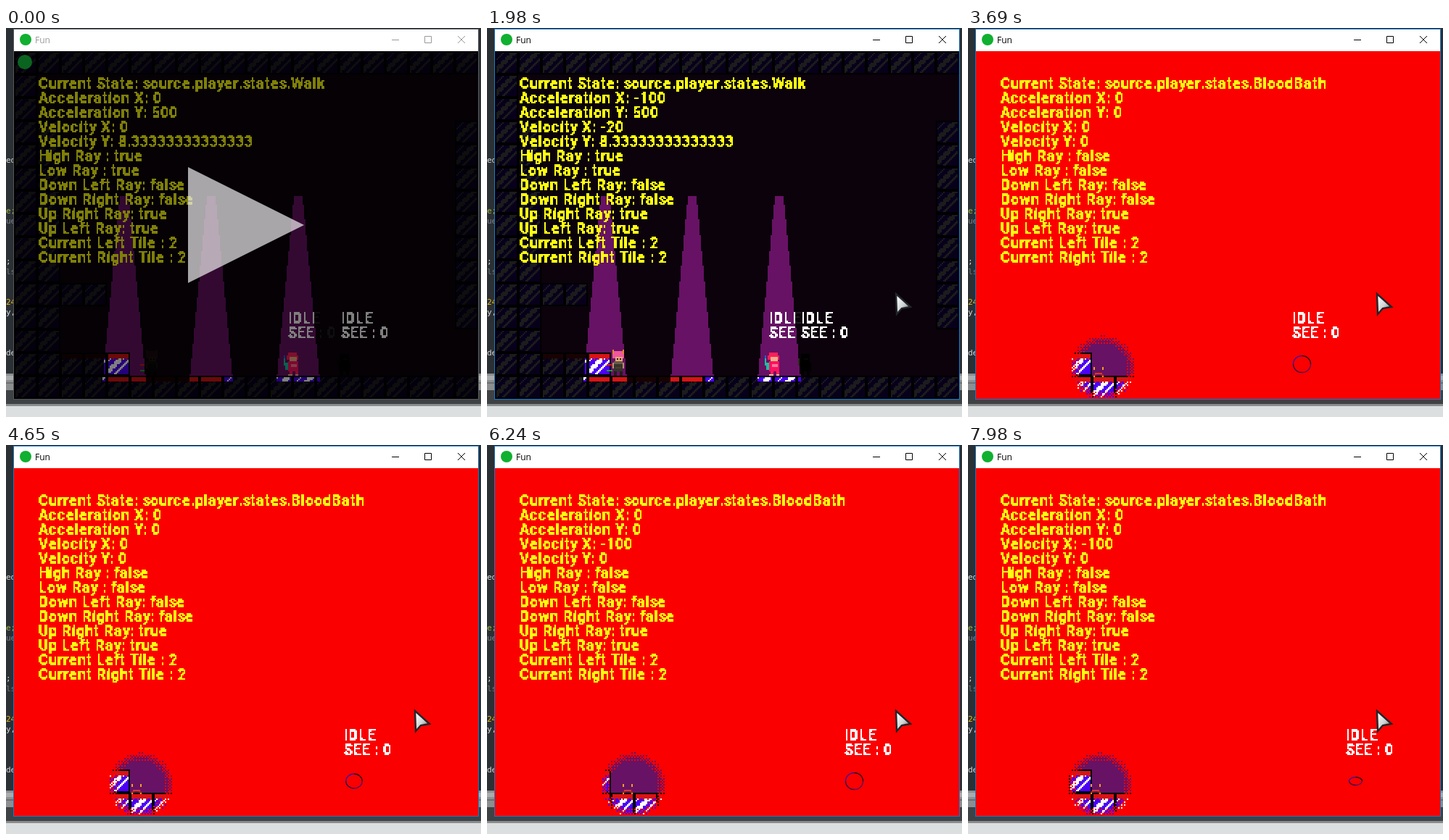
An HTML page with a canvas that plays this animation: 655x537 px, repeating every 8 s.

```html
<!DOCTYPE html>
<html lang="en">
<head>
<meta charset="utf-8">
<title>Fun</title>
<style>
  html, body { margin: 0; width: 100%; height: 100%; overflow: hidden; background: #2b3035; }
  canvas { display: block; image-rendering: pixelated; }
</style>
</head>
<body>
<canvas id="stage" width="655" height="537"></canvas>
<script>
const LOOP = 8000, FOCUS = 600, RED_START = 3060, RED_END = 3450;
const GX = 11, GY = 32, GW = 320, GH = 240;

const makeCtx = (w, h) => {
  const c = document.createElement('canvas');
  c.width = w;
  c.height = h;
  return c.getContext('2d', { willReadFrequently: true });
};
const ctx = document.getElementById('stage').getContext('2d');
const world = makeCtx(GW, GH), scene = makeCtx(GW, GH), mask = makeCtx(GW, GH);
const clamp = (v, a, b) => Math.min(b, Math.max(a, v));
const toGame = x => Math.round((x - GX) / 2);

function rect(g, color, x, y, w, h) {
  g.fillStyle = color;
  g.fillRect(x, y, w, h);
}

// Linear interpolation through [time, value] pairs.
function track(keys, t) {
  for (let i = 1; i < keys.length; i++) {
    const [t0, v0] = keys[i - 1], [t1, v1] = keys[i];
    if (t < t1) return v0 + (v1 - v0) * clamp((t - t0) / (t1 - t0), 0, 1);
  }
  return keys[keys.length - 1][1];
}

const ENEMY = [[600, 463], [1290, 448], [2080, 432], [2900, 432], [5220, 479],
  [6000, 494], [6540, 494], [7980, 522]];
const WALK = [[1500, 200], [2050, 179]];
const BATH = [[4740, 186], [5310, 300], [5750, 300], [6340, 182], [6780, 182],
  [7030, 232], [7440, 232], [7690, 182]];

/* Pixel text: glyphs on whole pixels, hard edges, doubled when shown */
const textCache = new Map();
function pixelText(text, color) {
  const key = color + text;
  if (textCache.has(key)) return textCache.get(key);
  const g = makeCtx(text.length * 10 + 4, 12);
  g.font = 'bold 10px Roboto, sans-serif';
  g.fillStyle = color;
  let x = 0;
  for (const ch of text) {
    g.fillText(ch, x, 8);
    x += Math.round(g.measureText(ch).width + 0.3);
  }
  const img = g.getImageData(0, 0, g.canvas.width, 12);
  for (let i = 3; i < img.data.length; i += 4) img.data[i] = img.data[i] > 95 ? 255 : 0;
  g.putImageData(img, 0, 0);
  textCache.set(key, g.canvas);
  return g.canvas;
}
function label(text, color, x, y) {
  const s = pixelText(text, color);
  ctx.drawImage(s, Math.round(x) - 1, y, s.width * 2, s.height * 2);
}

/* Level */
const isSolid = (c, r) => r === 0 || r === 14 || c === 0 || (c === 1 && r >= 3) ||
  (c === 19 && r >= 3 && r <= 11) || (r === 10 && c < 4) || (r === 13 && c < 5);
const isBloody = (c, r) => (r === 13 && c >= 2 && c <= 4) || (r === 14 && c >= 4 && c <= 8);

function drawTile(g, c, r) {
  const ox = c * 16, oy = r * 16;
  rect(g, '#000', ox, oy, 16, 16);
  for (let y = 1; y < 15; y++) {
    for (let x = 1; x < 15; x++) {
      const s = x + y, wobble = (x * 5 + c) % 3 === 0 ? 1 : 0;
      let color = '#4b00f5';
      if (Math.abs(s - 13) < 3 - wobble || s === 19 || s === 20 || s === 6) color = '#fff';
      if (isBloody(c, r) && y < 4 + wobble) color = '#d81414';
      rect(g, color, ox + x, oy + y, 1, 1);
    }
  }
}

const level = makeCtx(GW, GH);
rect(level, '#671265', 0, 0, GW, GH);
for (let r = 0; r < 15; r++)
  for (let c = 0; c < 20; c++)
    if (isSolid(c, r)) drawTile(level, c, r);

const cones = new Path2D();
for (const cx of [76, 136, 196]) {
  for (let y = 100; y < 228; y++) {
    const half = 3 + Math.round(12 * (y - 100) / 128);
    cones.rect(cx - half, y, half * 2, 1);
  }
}

/* Characters, built from blocks around the point between their feet */
const blocks = (x, y, list) => list.forEach(([c, dx, dy, w, h]) => rect(world, c, x + dx, y + dy, w, h));

function drawPlayer(x, bob, dir) {
  blocks(x, 224 + bob, [
    ['#e08a28', -4, -18, 1, 3], ['#e08a28', 3, -18, 1, 3],
    ['#f0589c', -3, -17, 6, 3], ['#f0589c', -4, -15, 8, 3],
    ['#e2a878', -2, -13, 5, 3], ['#301818', -1, -12, 1, 1], ['#301818', 1, -12, 1, 1],
    ['#6a5a48', -3, -10, 6, 2], ['#b89070', -4, -9, 1, 4], ['#b89070', 3, -9, 1, 4]]);
  blocks(x, 224, [
    ['#33352c', -3, -8, 6, 5], ['#5a3a2a', -2, -6, 4, 1],
    ['#241c1c', -3, -3, 2, 3], ['#241c1c', 1, -3, 2, 3]]);
  const rx = dir < 0 ? -8 : 4;
  blocks(x, 224, [['#d01818', rx, -8, 4, 1], ['#18a030', rx, -4, 4, 1]]);
}

function drawFriend(x) {
  blocks(x, 224, [
    ['#ff1f5a', -3, -16, 6, 2], ['#ff1f5a', -4, -14, 8, 3], ['#f0b088', -2, -13, 5, 3],
    ['#ff1060', -3, -10, 7, 7], ['#ff7898', -1, -8, 4, 2], ['#18c0a0', -6, -12, 1, 5],
    ['#18c0a0', -5, -9, 2, 5], ['#2060d0', -6, -14, 1, 2],
    ['#ff1f5a', -2, -3, 2, 2], ['#ff1f5a', 2, -3, 2, 2],
    ['#f0c0a0', -3, -1, 3, 1], ['#f0c0a0', 2, -1, 2, 1]]);
}

function drawEnemy(x) {
  blocks(x, 224, [
    ['#000', -3, -15, 6, 6], ['#000', -4, -9, 8, 6], ['#302820', -5, -12, 1, 5],
    ['#504438', -1, -12, 3, 1], ['#000', -3, -3, 2, 3], ['#000', 1, -3, 2, 3]]);
}

function drawFace(cx) {
  const x = toGame(cx) - 4;
  for (const dx of [-3, 3])
    for (const dy of [218, 224]) rect(world, '#f0a018', x + dx, dy, 1, dy === 218 ? 2 : 1);
  rect(world, '#d83a28', x - 2, 222, 5, 1);
  rect(world, '#a81c30', x - 3, 223, 2, 1);
  rect(world, '#a81c30', x + 2, 223, 2, 1);
}

/* Red cover with a dithered hole and a thin ring round the enemy */
const cover = mask.createImageData(GW, GH);
const coverPx = new Uint32Array(cover.data.buffer);
const RED = 0xff0000fa;
function drawCover(cx, radius) {
  const nx = (cx - GX) / 2, ny = 218.5;
  for (let y = 0, i = 0; y < GH; y++) {
    for (let x = 0; x < GW; x++, i++) {
      const depth = radius - Math.hypot(x + 0.5 - nx, y + 0.5 - ny);
      const bayer = 2 * ((x ^ y) & 1) + (y & 1);
      coverPx[i] = depth > 7 * (bayer + 0.5) / 4 ? 0 : RED;
    }
  }
  mask.putImageData(cover, 0, 0);
}

function drawRing(cx, t) {
  const phase = (((t - 3690) / 2550) % 1 + 1) % 1;
  const squash = clamp((0.3 - Math.abs(phase - 0.64)) / 0.15, 0, 1);
  const rx = 12 - 3 * squash, ry = 11.5 - 6 * squash;
  ctx.lineWidth = 1.4;
  ['#5a1060', '#2a0a50', '#4010a0', '#200818'].forEach((color, i) => {
    ctx.strokeStyle = color;
    ctx.beginPath();
    ctx.ellipse(cx, 464, rx, ry, 0, i * Math.PI / 2, (i + 1) * Math.PI / 2);
    ctx.stroke();
  });
}

/* Debug read-out */
function velocityAt(t) {
  if ((t >= 4740 && t < 5310) || (t >= 6780 && t < 7030)) return 100;
  if ((t >= 5750 && t < 6510) || t >= 7440) return -100;
  return t >= 1500 && t < 2050 ? -20 : 0;
}
function accelAt(t) {
  if (t >= 1500 && t < 2050) return -100;
  return t >= 2050 && t < 2220 ? 100 : 0;
}
function drawDebug(t, red) {
  [
    'Current State: source.player.states.' + (red ? 'BloodBath' : 'Walk'),
    'Acceleration X: ' + accelAt(t),
    'Acceleration Y: ' + (red ? 0 : 500),
    'Velocity X: ' + velocityAt(t),
    'Velocity Y: ' + (red ? '0' : '8.33333333333333'),
    'High Ray : ' + !red,
    'Low Ray : ' + !red,
    'Down Left Ray: false',
    'Down Right Ray: false',
    'Up Right Ray: true',
    'Up Left Ray: true',
    'Current Left Tile : 2',
    'Current Right Tile : 2'
  ].forEach((line, i) => label(line, '#ffff10', 46, 68 + 20 * i));
}

/* Desktop and window frame */
function drawDesktop() {
  rect(ctx, '#2b3035', 0, 0, 655, 537);
  rect(ctx, '#8c8e8f', 0, 477, 655, 23);
  rect(ctx, '#a9abac', 0, 480, 655, 6);
  rect(ctx, '#6c6f71', 0, 489, 655, 2);
  rect(ctx, '#3e4245', 0, 500, 655, 19);
  rect(ctx, '#8a8c8d', 0, 519, 655, 3);
  rect(ctx, '#dcdfdf', 0, 522, 655, 15);
  ctx.font = '11px "DejaVu Sans Mono", monospace';
  const code = [['ed', 186, '#d8d8d8'], ['e;', 256, '#a0b848'], ['ue', 270, '#7c8488'],
    [';', 326, '#d8d8d8'], ['ls', 340, '#6c7c78'], ['24', 382, '#e8b820'],
    ['y,', 396, '#d8d8d8'], ['de', 452, '#d8d8d8']];
  for (const [s, y, c] of code) {
    ctx.fillStyle = c;
    ctx.fillText(s, 0, y);
  }
}

function drawFrame(active) {
  rect(ctx, active ? '#1a78c8' : '#55585a', 10, 1, 642, 512);
  rect(ctx, '#fff', 11, 2, 640, 30);
  dot(27, 16, 8, '#10b030');
  ctx.font = '12px "Open Sans", sans-serif';
  ctx.fillStyle = ctx.strokeStyle = active ? '#000' : '#999';
  ctx.fillText('Fun', 40, 21);
  ctx.lineWidth = 1;
  ctx.beginPath();
  ctx.moveTo(532, 16.5);
  ctx.lineTo(542, 16.5);
  ctx.rect(577.5, 11.5, 9, 9);
  ctx.moveTo(623, 11);
  ctx.lineTo(633, 21);
  ctx.moveTo(633, 11);
  ctx.lineTo(623, 21);
  ctx.stroke();
}

function dot(x, y, r, color) {
  ctx.fillStyle = color;
  ctx.beginPath();
  ctx.arc(x, y, r, 0, Math.PI * 2);
  ctx.fill();
}

function polygon(points) {
  ctx.beginPath();
  points.forEach(([x, y]) => ctx.lineTo(x, y));
  ctx.closePath();
}

function drawPause() {
  rect(ctx, 'rgba(0,0,0,0.5)', GX, GY, 640, 480);
  polygon([[251, 192], [251, 352], [411, 272]]);
  ctx.fillStyle = 'rgba(255,255,255,0.65)';
  ctx.fill();
  dot(26, 47, 10, '#0a6420');
}

function drawCursor(t) {
  const k = clamp((t - FOCUS) / 600, 0, 1), left = (1 - k) ** 3;
  ctx.save();
  ctx.translate(564 + 28 * left, 367 + 126 * left);
  polygon([[0, 0], [1, 28], [8, 20], [20, 18]]);
  const shade = ctx.createLinearGradient(2, 6, 18, 18);
  shade.addColorStop(0, '#f8f8f8');
  shade.addColorStop(0.6, '#d0d4d4');
  shade.addColorStop(1, '#8c9090');
  ctx.fillStyle = shade;
  ctx.fill();
  ctx.lineWidth = 2.4;
  ctx.strokeStyle = '#20262a';
  ctx.stroke();
  ctx.restore();
}

function drawWorld(t, enemyX, bathX, red) {
  world.drawImage(level.canvas, 0, 0);
  if (red) {
    drawFace(bathX);
    return;
  }
  drawFriend(192);
  world.drawImage(pixelText('IDLE', '#fff'), 189, 180);
  world.drawImage(pixelText('SEE : 0', '#fff'), 189, 190);
  drawEnemy(toGame(enemyX + 4));
  drawPlayer(toGame(track(WALK, t)), t >= 2520 ? 1 : 0, t < 2050 ? -1 : 1);
}

function drawGame(t) {
  const red = t >= RED_START;
  const enemyX = track(ENEMY, t), bathX = track(BATH, t);
  drawWorld(t, enemyX, bathX, red);

  rect(scene, '#000', 0, 0, GW, GH);
  if (red) {
    const k = clamp((t - RED_START) / (RED_END - RED_START), 0, 1);
    drawCover(bathX, 23 + 300 * (1 - k) ** 2);
    scene.drawImage(world.canvas, 0, 0);
    scene.drawImage(mask.canvas, 0, 0);
  } else {
    scene.globalAlpha = 0.11;
    scene.drawImage(world.canvas, 0, 0);
    scene.globalAlpha = 1;
    scene.save();
    scene.clip(cones);
    scene.drawImage(world.canvas, 0, 0);
    scene.restore();
  }
  ctx.drawImage(scene.canvas, GX, GY, GW * 2, GH * 2);

  if (t >= RED_END) drawRing(enemyX + 12.5, t);
  drawDebug(t, red);
  label('IDLE', '#fff', enemyX, 392);
  label('SEE : 0', '#fff', enemyX, 412);
}

function draw(t) {
  const active = t >= FOCUS;
  ctx.imageSmoothingEnabled = false;
  drawDesktop();
  drawFrame(active);
  drawGame(t);
  if (active) drawCursor(t);
  else drawPause();
}

const start = performance.now();
function tick() {
  draw((performance.now() - start) % LOOP);
  requestAnimationFrame(tick);
}
tick();
</script>
</body>
</html>
```
